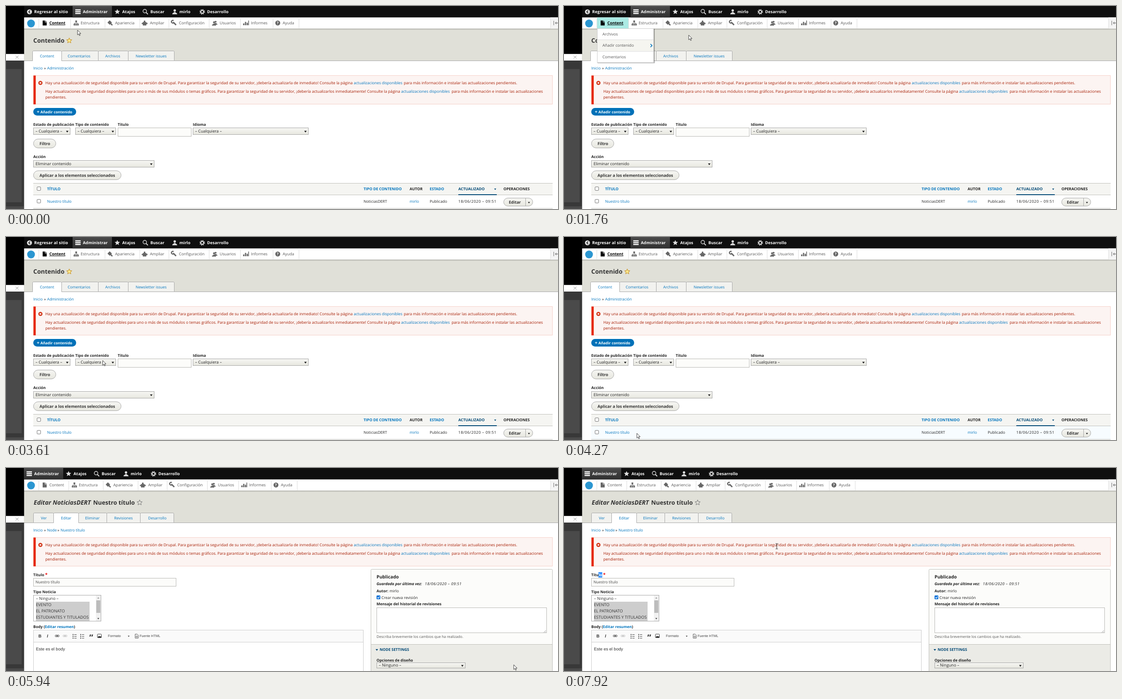
Write an HTML page that moves like this. It is 1235 px wide and 454 px high and loops after 8 s.

```html
<!DOCTYPE html>
<html lang="es">
<head>
<meta charset="utf-8">
<title>Edición de contenido</title>
<style>
  html, body { margin: 0; width: 100%; height: 100%; overflow: hidden; background: #fff; }
  svg { display: block; width: 100%; height: 100%; }
  text { font-family: "Open Sans", "Noto Sans", sans-serif; text-rendering: geometricPrecision; white-space: pre; }
  .b { font-weight: 700; }
  .i { font-style: italic; }
  .bar { font-weight: 700; letter-spacing: .15px; }
  .date { letter-spacing: .5px; }
  .arial { font-family: "Liberation Sans", Arial, sans-serif; }
  .u { text-decoration: underline; }
</style>
</head>
<body>
<svg id="stage" viewBox="0 0 1235 454" xmlns="http://www.w3.org/2000/svg"></svg>
<script>
const LOOP = 8000;
const BLUE = '#0074bd', INK = '#222', GREY = '#666', LINE = '#a6a6a6', SOFT = '#b8b8b4', RED = '#a51b00';
const USER = 'mirlo', TYPE = 'NoticiasDERT';

// Drawing helpers: each returns SVG markup.
const text = (x, y, size, str, fill = INK, cls = '') =>
  `<text x="${x}" y="${y}" font-size="${size}" fill="${fill}" class="${cls}">${str}</text>`;
const bold = (x, y, str, fill = INK, size = 8.45) => text(x, y, size, str, fill, 'b');
const rect = (x, y, w, h, fill, extra = '') =>
  `<rect x="${x}" y="${y}" width="${w}" height="${h}" fill="${fill}" ${extra}/>`;
const box = (x, y, w, h, fill, stroke = LINE, r = 0) =>
  rect(x + .5, y + .5, w - 1, h - 1, fill, `stroke="${stroke}" rx="${r}"`);
const path = (d, fill = 'none', stroke = 'none', width = 1) =>
  `<path d="${d}" fill="${fill}" stroke="${stroke}" stroke-width="${width}"/>`;
const circle = (x, y, r, fill, stroke = 'none', width = 1, extra = '') =>
  `<circle cx="${x}" cy="${y}" r="${r}" fill="${fill}" stroke="${stroke}" stroke-width="${width}" ${extra}/>`;
const group = (id, content, extra = '') => `<g id="${id}" ${extra}>${content}</g>`;
const at = (x, y, content) => `<g transform="translate(${x} ${y})">${content}</g>`;
const caret = (x, y, fill = INK, s = 2.8) => path(`M${x - s} ${y - s / 2}h${2 * s}l${-s} ${s * 1.4}z`, fill);

function star(x, y, r, fill, stroke) {
  let d = '';
  for (let i = 0; i < 10; i++) {
    const a = i * Math.PI / 5 - Math.PI / 2, q = i % 2 ? r * .45 : r;
    d += `${i ? 'L' : 'M'}${(x + q * Math.cos(a)).toFixed(2)} ${(y + q * Math.sin(a)).toFixed(2)}`;
  }
  return path(d + 'z', fill, stroke);
}
const select = (x, y, w, h, label) =>
  box(x, y, w, h, 'url(#button)') + text(x + 5, y + h / 2 + 2.8, 9.15, label) + caret(x + w - 7, y + h / 2 + .5);
const button = (x, y, w, h, label, tx) =>
  box(x, y, w, h, 'url(#button)', LINE, h / 2) + bold(tx, y + h / 2 + 3.2, label, '#333', 9);
const checkbox = (x, y) => box(x, y, 9, 9, '#fff', '#767676', 1.5);

function tabs(edges, labels, active) {
  return labels.map(([x, label], i) => {
    const left = edges[i], w = edges[i + 1] - left + 1, on = i === active;
    return box(left, 100, w, 24, on ? '#fff' : '#f2f2ef', LINE, 2) +
      rect(left + (on ? 1 : 0), 122, w - (on ? 2 : 0), 2, '#fff') +
      (on ? '' : rect(left, 122, w, 1, LINE)) + text(x, 115, 8.5, label, BLUE);
  }).join('');
}

// Icons are centred on the origin.
const people = (c) => circle(0, -3, 2.7, c) + path('M-5.5 5.5C-5.5 2-2 2.5-1.5 .5h3C2 2.5 5.5 2 5.5 5.5z', c);
const icons = {
  doc: c => path('M-4-5.5h5v4h4v7h-9z', c) + path('M2-5.5l3 3h-3z', c),
  tree: c => path('M-4 2.5v-2h8v2M0 .5v-3', 'none', c, 1.2) + rect(-2, -5.5, 4, 3.5, c) +
    [-6, -2, 2].map(x => rect(x + .3, 2, 3.4, 3.5, c)).join(''),
  paint: c => path('M-6-1l5-5 5 5-5 5z', c) + path('M1 1l4 4', 'none', c, 2.6),
  puzzle: c => rect(-4, -2, 8, 7.5, c) + circle(0, -3.5, 2, c) + circle(5, 1, 1.8, c) + circle(-5, 1, 1.6, c),
  wrench: c => path('M-2-2l6.5 6.5', 'none', c, 3) + path('M-1-5.2A3 3 0 1 0-.6-.8', 'none', c, 2.4),
  users: c => at(2, -.5, `<g transform="scale(.75)">${people(c)}</g>`) + at(-1.5, 1, `<g transform="scale(.85)">${people(c)}</g>`),
  chart: c => rect(-6.5, 1, 2.8, 4, c) + rect(-2.5, -2.5, 2.8, 7.5, c) + rect(1.5, -.5, 2.8, 5.5, c) + rect(4.9, -5.5, 1.6, 10.5, c),
  help: c => circle(0, 0, 5.5, c) + bold(-2.2, 3.1, '?', '#fff', 8.5),
};

function shortcuts() {
  return rect(149, 0, 88, 25.5, 'url(#active)') +
    [8, 12, 16].map(y => rect(155, y - .5, 12, 2.5, '#fff')).join('') +
    star(249, 13, 6.3, '#ddd', 'none') +
    circle(310.5, 11.5, 4, 'none', '#ddd', 1.4) + path('M313.5 14.5l4 4', 'none', '#ddd', 1.8) +
    at(377.5, 13, people('#ddd')) +
    circle(439, 13, 3.2, 'none', '#ddd', 2) + circle(439, 13, 5, 'none', '#ddd', 2, 'stroke-dasharray="2 1.93"') +
    [[172, 'Administrar'], [260, 'Atajos'], [323, 'Buscar'], [388, USER], [450, 'Desarrollo']]
      .map(([x, s]) => text(x, 16.3, 9, s, '#fff', 'bar')).join('');
}

function tray(shift) {
  const items = [['tree', 157, 167, 'Estructura', 221], ['paint', 233, 244, 'Apariencia', 299],
    ['puzzle', 310, 322, 'Ampliar', 364], ['wrench', 376, 387, 'Configuración', 454],
    ['users', 467, 478, 'Usuarios', 524], ['chart', 537, 548, 'Informes', 597], ['help', 608, 619, 'Ayuda', 655]];
  return rect(144 - shift, 25.5, 1, 25, '#ddd') + items.map(([icon, ix, x, label, edge]) =>
    at(ix - shift, 38, icons[icon](GREY)) + text(x - shift, 41, 8.8, label, '#565656') +
    rect(edge - shift, 25.5, 1, 25, '#ddd')).join('');
}

function message() {
  const link = (x, y) => text(x, y, 8.6, 'actualizaciones disponibles', BLUE);
  const line = (x, y, s) => text(x, y, 8.63, s, RED);
  return box(61, 155, 1162, 65, '#fcf4f2', '#f5cfc7') + rect(61.5, 155.5, 5, 64.5, '#e62600') +
    circle(77, 172, 4.6, '#d02c0c') + path('M75.2 170.2l3.6 3.6m0-3.6l-3.6 3.6', 'none', '#fff', 1.4) +
    line(88, 175, 'Hay una actualización de seguridad disponible para su versión de Drupal. Para garantizar la seguridad de su servidor, ¡debería actualizarla de inmediato! Consulte la página') +
    link(778, 175) + line(890, 175, 'para más información e instalar las actualizaciones pendientes.') +
    line(88, 193.5, 'Hay actualizaciones de seguridad disponibles para uno o más de sus módulos o temas gráficos. Para garantizar la seguridad de su servidor, ¡debería actualizarlos inmediatamente! Consulte la página') +
    link(884, 193.5) + line(997, 193.5, 'para más información e instalar las actualizaciones') + line(88, 206.5, 'pendientes.');
}

function frame() {
  return rect(40, 50, 1195, 72, '#e0e0d8') + rect(40, 50.5, 1195, 4, 'url(#shadow)') +
    rect(40, 122, 1195, 1, LINE) + rect(40, 25, 1195, 25.5, '#fff') + rect(40, 0, 1195, 25.5, '#0f0f0f') +
    rect(0, 0, 40.5, 107.5, '#000') + rect(0, 107.5, 40, 14.5, '#fff') +
    path('M21.5 111l6.5 6.5m0-6.5l-6.5 6.5', 'none', '#888', .9) +
    rect(0, 122, 40.5, 332, '#383838') + rect(0, 141, 35, 298, '#4a4a4a') + rect(0, 448, 40, 6, '#4a4a4a') +
    rect(73, 25.5, 1, 25, '#ddd') + circle(56, 39, 8.7, '#2b96d1') +
    rect(1218, 25.5, 17, 25, '#f5f5f5') + rect(1218, 25.5, 1, 25, '#ddd') +
    path('M1225.5 33v10M1235 38h-6m2.5-2.5l-2.5 2.5 2.5 2.5', 'none', '#888', 1.3) + message();
}

function listPage() {
  const heads = [[92, 'TÍTULO', BLUE], [800, 'TIPO DE CONTENIDO', BLUE], [903, 'AUTOR', INK],
    [948, 'ESTADO', BLUE], [1012, 'ACTUALIZADO', '#004875'], [1113, 'OPERACIONES', INK]];
  return circle(52.5, 13, 5.6, '#ddd') + path('M54 10l-3 3 3 3', 'none', '#111', 1.6) +
    text(63, 16.3, 9.2, 'Regresar al sitio', '#fff', 'bar') + shortcuts() +
    group('focus', rect(74, 25.5, 70, 25, '#abeae4')) +
    at(86, 38, icons.doc('#000')) + text(97, 41, 8.9, 'Content', '#000', 'b u') + tray(0) +
    bold(61, 82, 'Contenido', '#333', 13.55) + star(141.5, 77.5, 6.2, '#fbe98c', '#c48a1a') +
    tabs([59, 124, 206, 273, 376], [[76, 'Content'], [138, 'Comentarios'], [222, 'Archivos'], [290, 'Newsletter issues']], 0) +
    text(61, 142, 8.5, 'Inicio', BLUE) + text(85, 142, 8.5, '»') + text(92, 142, 8.5, 'Administración', BLUE) +
    rect(61, 228, 96, 17, '#0071b8', 'rx="8.5"') + bold(69, 240, '+', '#fff', 10) + bold(77, 239.6, 'Añadir contenido', '#fff', 8.25) +
    bold(61, 268, 'Estado de publicación') + bold(155, 268, 'Tipo de contenido') + bold(250, 268, 'Título') + bold(418, 268, 'Idioma') +
    select(61, 272, 83, 16, '– Cualquiera –') + select(155, 272, 91, 16, '– Cualquiera –') +
    box(250, 272, 165, 20, '#fcfcfa', SOFT) + select(418, 272, 259, 16, '– Cualquiera –') +
    button(61, 297, 51, 21, 'Filtro', 75) + bold(61, 340, 'Acción') +
    select(61, 345, 271, 16, 'Eliminar contenido') + button(61, 368, 197, 21, 'Aplicar a los elementos seleccionados', 75) +
    rect(61, 396, 1162, 27, '#f5f5f2') + rect(61, 396, 1162, 1, '#bfbfba') + rect(61, 422, 1162, 1, '#bfbfba') +
    checkbox(69, 404) + heads.map(([x, s, c]) => bold(x, 412.2, s, c, 8.4)).join('') +
    caret(1094.5, 409.5, '#004875', 2.3) + rect(1012, 421, 86, 2, '#004875') +
    group('hover', rect(61, 423, 1162, 29, '#f7fcff')) + rect(61, 452, 1162, 1, '#bfbfba') +
    checkbox(69, 432) + group('link', text(92, 440, 8.5, 'Nuestro título', BLUE)) +
    text(800, 440, 8.5, TYPE) + text(903, 440, 8.5, USER, BLUE) + text(948, 440, 8.5, 'Publicado') +
    text(1012, 440, 8.6, '18/06/2020 – 09:51', INK, 'date') +
    button(1113, 429, 66, 19, 'Editar', 1125) + rect(1162, 430, 1, 17, LINE) + caret(1170, 439.5, INK, 2.3) +
    group('menu', rect(75, 51, 128, 77, '#000', 'opacity=".3"') + box(74, 50, 127, 77, '#fff', '#ccc') +
      rect(75, 76, 125, 25, '#f5f5f0') + rect(75, 75, 125, 1, '#ddd') + rect(75, 101, 125, 1, '#ddd') +
      text(86, 66, 8.75, 'Archivos', '#565656') + text(86, 91.3, 8.75, 'Añadir contenido', '#565656') +
      text(86, 116.6, 8.75, 'Comentarios', '#565656') + path('M193.5 85l3.3 3.5-3.3 3.5', 'none', BLUE, 1.8));
}

function editor() {
  const dots = x => [372, 376, 380].map(y => rect(x, y - .5, 2, 2, '#444') + rect(x + 3.5, y, 5.5, 1, '#444')).join('');
  const chain = (x, c) => rect(x, 373.5, 5, 4, 'none', `stroke="${c}" rx="2"`) +
    rect(x + 4, 373.5, 5, 4, 'none', `stroke="${c}" rx="2"`) + rect(x + 2, 375, 5, 1, c);
  return box(61, 362, 739, 100, '#fff', '#ccc') + rect(62, 363, 737, 26, '#fafafa') + rect(62, 389, 737, 1, '#ccc') +
    text(72.5, 379.2, 9.5, 'B', '#333', 'arial b') + text(91.5, 379.2, 9.5, 'I', '#333', 'arial b i') +
    chain(110, '#444') + chain(127.5, '#bbb') + dots(149) + dots(166) + bold(186.5, 386, '”', '#333', 19) +
    box(204, 371, 10, 9, '#fff', '#333', 1) + path('M205 379l3-4 2 2 1.5-1.5 2 3.5z', '#333') +
    text(228, 378.4, 7.75, 'Formato', '#444', 'arial') + caret(274.5, 376, '#444', 2) +
    path('M289 371.5h4.5l2.5 2.5v6.5h-7z', 'none', '#555') + circle(292.5, 377, 1.6, 'none', '#555') +
    text(299, 378.4, 7.55, 'Fuente HTML', '#444', 'arial') + text(67, 408, 9.5, 'Este es el body', '#333', 'arial');
}

function sidePanel() {
  return box(816, 226, 407, 240, '#fcfcfa', '#bfbfba', 2) + rect(817, 394, 405, 60, '#ebebe6') + rect(817, 394, 405, 1, '#bfbfba') +
    bold(829, 247, 'Publicado', INK, 10.2) + text(829, 262, 8.5, 'Guardado por última vez:', INK, 'b i') +
    text(937, 262, 8.6, '18/06/2020 – 09:51', INK, 'date i') + bold(829, 277.5, 'Autor:') + text(858, 277.5, 8.55, USER) +
    rect(829, 285, 8.5, 8.5, '#0b72d9', 'rx="1.5"') + path('M830.8 289.3l2 2 3.2-4', 'none', '#fff', 1.3) +
    text(840, 293, 8.55, 'Crear nueva revisión') + bold(829, 307.3, 'Mensaje del historial de revisiones') +
    box(829, 312, 381, 57, '#fff', SOFT) + path('M1208 363l-5 5m5-2l-2 2', 'none', '#888', .8) +
    text(829, 379.7, 8.1, 'Describa brevemente los cambios que ha realizado.', '#555') +
    caret(829.7, 406.3, '#004875', 2.8) + bold(836, 409.2, 'NODE SETTINGS', '#004875', 8.4) +
    bold(829, 432.5, 'Opciones de diseño') + select(829, 435, 199, 13, '– Ninguno –');
}

function editPage() {
  const options = ['– Ninguno –', 'EVENTO', 'EL PATRONATO', 'ESTUDIANTES Y TITULADOS'];
  return at(-109, 0, shortcuts()) + at(86, 38, icons.doc(GREY)) + text(97, 41, 8.8, 'Content', '#565656') + tray(4) +
    text(62, 82, 13.65, 'Editar ' + TYPE, '#333', 'b i') + bold(195, 82, 'Nuestro título', '#333', 13.2) +
    star(299, 77.5, 6.2, 'none', '#777') +
    tabs([61, 106, 162, 225, 300, 375], [[78, 'Ver'], [123, 'Editar'], [177, 'Eliminar'], [242, 'Revisiones'], [318, 'Desarrollo']], 1) +
    text(61, 142, 8.5, 'Inicio', BLUE) + text(85, 142, 8.5, '»') + text(92, 142, 8.5, 'Node', BLUE) +
    text(115, 142, 8.5, '»') + text(122, 142, 8.5, 'Nuestro título', BLUE) +
    bold(61, 241.7, 'Título') + group('selection', rect(77, 233, 8.5, 12, '#3390ff') + bold(77.4, 241.7, 'lo', '#fff')) +
    bold(87.5, 242, '*', '#e00', 10) + box(61, 246, 320, 19, '#fcfcfa', SOFT) + text(66, 258.2, 8.5, 'Nuestro título', '#444') +
    bold(61, 280, 'Tipo Noticia') + box(61, 284, 152, 59, '#fff') + rect(67, 299, 120, 43, '#cdcdcd') +
    options.map((s, i) => text(67, 295.3 + i * 14, 9.2, s, '#333')).join('') +
    rect(201, 285, 11, 57, '#f1f1f1') + rect(202, 296, 9, 28, '#bcbcbc') + caret(206.5, 336.5, '#444', 2.2) +
    path('M204.3 292h4.4l-2.2-3z', '#999') +
    text(61, 358, 8.45, `Body (<tspan fill="${BLUE}">Editar resumen</tspan>)`, INK, 'b') + editor() + sidePanel();
}

const gradient = (id, from, to, alpha = 1) => `<linearGradient id="${id}" x2="0" y2="1"><stop stop-color="${from}"/>` +
  `<stop offset="1" stop-color="${to}" stop-opacity="${alpha}"/></linearGradient>`;
const pointers =
  group('arrow', path('M0 0V10.6L2.5 8.3 4.2 12.2 5.9 11.5 4.2 7.7H7.5z', '#fff', '#111', .8)) +
  group('hand', path('M-1.2 9V1.2Q0-.8 1.2 1.2V5l4.4 1.1Q7 6.6 6.8 8L6 11.5V14H-.2V12.5L-3.6 8.7Q-3.6 7-1.2 9z', '#fff', '#111', .9)) +
  group('beam', path('M-2.5-6h2L0-5.5.5-6h2M-2.5 6h2L0 5.5.5 6h2M0-5.5v11', 'none', '#222'));

document.getElementById('stage').innerHTML =
  `<defs>${gradient('button', '#f6f6f3', '#e7e7df')}${gradient('active', '#4b4b4b', '#303030')}${gradient('shadow', '#8e8e88', '#e0e0d8', 0)}</defs>` +
  frame() + group('list', listPage()) + group('edit', editPage()) +
  group('press', circle(101, 235.5, 7.5, '#fff01e', 'none', 1, 'opacity=".8"')) + group('pointer', pointers);

// Pointer moves: start, end, number of steps, way points.
const moves = [
  [0, 0, 1, [[160, 54]]],
  [320, 880, 6, [[158, 50], [141, 37], [147, 40]]],
  [1100, 1760, 7, [[148, 42], [230, 58], [279, 65]]],
  [3180, 3930, 8, [[277, 72], [230, 250], [134, 433]]],
  [4050, 4050, 1, [[133, 435]]],
  [4270, 5040, 8, [[163, 439], [891, 440]]],
  [5160, 5820, 7, [[950, 441], [1136, 440]]],
  [6150, 6710, 6, [[1080, 432], [101, 235]]],
  [7040, 7800, 8, [[140, 246], [350, 254], [639, 235], [588, 205]]],
  [7920, 7920, 1, [[476, 175]]],
];

function pointerAt(t) {
  const [start, end, steps, points] = moves.findLast(m => t >= m[0]);
  if (steps === 1) return points[0];
  const step = Math.min(steps - 1, Math.floor((t - start) / (end - start) * (steps - 1) + .01));
  const along = step / (steps - 1) * (points.length - 1);
  const i = Math.min(points.length - 2, Math.floor(along));
  return points[i].map((v, k) => v + (points[i + 1][k] - v) * (along - i));
}

const el = id => document.getElementById(id);
const show = (id, on) => el(id).style.display = on ? '' : 'none';
const inside = ([x, y], x0, y0, x1, y1) => x >= x0 && x <= x1 && y >= y0 && y <= y1;

function draw() {
  const t = performance.now() % LOOP;
  const p = pointerAt(t), onList = t < 5940;
  const onLink = onList && inside(p, 92, 430, 147, 446);
  const hand = onLink || onList && (inside(p, 1113, 429, 1179, 450) || inside(p, 75, 25, 149, 48));
  const beam = !onList && p[1] < 195;
  show('list', onList);
  show('edit', !onList);
  show('menu', t >= 540 && t < 2630);
  show('focus', t >= 1100 && t < 2630);
  show('hover', p[1] > 423);
  el('link').firstChild.setAttribute('class', onLink ? 'u' : '');
  show('selection', t >= 6598);
  show('press', t >= 6598 && t < 7040);
  show('hand', hand);
  show('beam', beam);
  show('arrow', !hand && !beam);
  el('pointer').setAttribute('transform', `translate(${p[0]} ${p[1]})`);
  requestAnimationFrame(draw);
}
draw();
</script>
</body>
</html>
```
